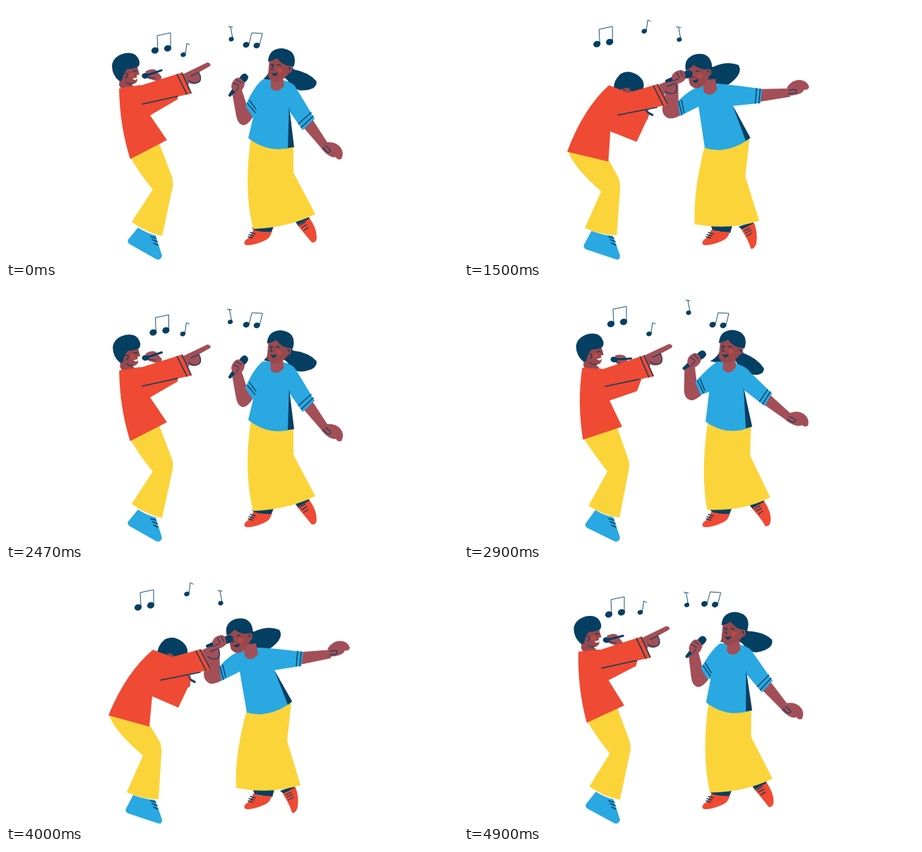
These frames come from a looping animation (640 by 360 pixels, 5000 ms). An HTML page:

```html
<!DOCTYPE html>
<html lang="en">
<head>
<meta charset="utf-8">
<title>Two singers</title>
<style>
  html, body { margin: 0; height: 100%; overflow: hidden; background: #fff; }
  svg { display: block; width: 640px; height: 360px; }
</style>
</head>
<body>
<svg id="stage" viewBox="0 0 640 360" stroke-linecap="round" stroke-linejoin="round"></svg>
<script>
const LOOP = 5000, BEAT = 2567;
const RED = '#ef4a33', BLUE = '#29a8e1', YELLOW = '#fbd43a', NAVY = '#053f61', SKIN = '#a34f58', FACE = '#98484d';
const stage = document.getElementById('stage');
const parts = [];

// Every part has three poses: leaning right, passing, leaning left.
const PASS = 0.655;
const numbers = s => s.match(/-?[\d.]+/g).map(Number);
function morph(poses, u) {
  const [a, m, b] = poses.map(numbers);
  let i = 0;
  return poses[0].replace(/-?[\d.]+/g, () => {
    const line = b[i] - a[i];
    const bend = (m[i] - a[i] - line * PASS) / (PASS * (1 - PASS));
    return (a[i++] + line * u + bend * u * (1 - u)).toFixed(2);
  });
}

function add(tag, attrs, inner = '') {
  const el = document.createElementNS('http://www.w3.org/2000/svg', tag);
  for (const k in attrs) el.setAttribute(k, attrs[k]);
  el.innerHTML = inner;
  stage.append(el);
  return el;
}
const shape = (fill, ...poses) => parts.push({ el: add('path', { fill }), attr: 'd', poses });
const line = (width, ...poses) =>
  parts.push({ el: add('path', { fill: 'none', stroke: NAVY, 'stroke-width': width }), attr: 'd', poses });
function group(inner, poses, late = false) {
  const el = add('g', {}, inner);
  parts.push({ el, attr: 'transform', late, poses: poses.map(([x, y, r]) => `translate(${x} ${y}) rotate(${r})`) });
  return el;
}
const fill = (color, d) => `<path fill="${color}" d="${d}"/>`;
const ink = (d, width = 1.2) => `<path fill="none" stroke="${NAVY}" stroke-width="${width}" d="${d}"/>`;

// Woman
const herHead = [[389, 82, 0], [349, 84, -5], [332, 90, -16]];
const hair = group(
  fill(NAVY, 'M0 -14L20 -4Q40 -14 56 -8Q64 4 44 20Q34 26 20 17L0 14Z') + fill(NAVY, ''), herHead, true);
const [lobe, strand] = hair.children;

shape(NAVY, 'M348 314L379 312L375 323L352 319Z', 'M349 313L380 311L376 322L352 318Z', 'M350 312L380 311L377 322L352 318Z');
shape(NAVY, 'M410 306L429 299L431 304L414 312Z', 'M394 311L415 304L417 310L399 316Z', 'M388 313L408 306L411 312L393 317Z');
add('path', { fill: RED, d: 'M350 317Q362 321 376 320Q375 329 365 333Q352 339 341 339Q335 338 339 332Q348 326 350 317Z' });
add('path', { fill: 'none', stroke: NAVY, 'stroke-width': 1.5, d: 'M346 321L353 323M344 324L351 326M343 327L349 329' });
shape(RED, 'M413 311L430 301Q440 315 440 328Q440 336 433 335Q428 329 413 311Z',
           'M398 315L416 306Q424 320 422 334Q419 343 414 342Q411 331 398 315Z',
           'M392 317L410 308Q415 321 413 336Q410 346 405 344Q402 333 392 317Z');
line(1.3, 'M416 311L424 306M419 314L426 310M422 318L428 314', 'M402 317L410 313M404 320L412 316M407 324L413 320',
          'M396 319L404 315M398 322L406 318M400 326L407 322');
shape(YELLOW, 'M347 186L407 198L407 236L438 295Q400 314 350 316Q336 260 347 186Z',
              'M343 192L405 190L401 240L424 301Q385 319 333 311Q329 260 343 192Z',
              'M341 198L404 188L398 242L417 305Q375 318 326 309Q323 265 341 198Z');

shape(SKIN, 'M421 172L434 161L457 197L450 206Z', 'M424 148L427 130L469 142L468 154Z', 'M417 134L420 116L461 113L460 125Z');
group(fill(SKIN, 'M-15 -4Q-6 -13 4 -11Q14 -9 16 1Q14 6 8 4Q4 11 -15 8Z') + ink('M-14 5Q-2 9 -3 2Q-7 0 -13 1'),
  [[463, 206, 40], [480, 145, 0], [471, 112, -12]]);
shape(SKIN, 'M341 140L350 157Q342 170 335 169Q328 167 326 155L320 122L333 116Z',
            'M311 130L315 149Q303 154 297 152Q288 149 289 138L297 102L312 100Z',
            'M303 139L306 156Q297 162 289 161Q280 157 280 147L287 108L302 108Z');
shape(BLUE,
  'M364 104L392 105Q408 108 412 118L437 160L420 176L402 150L407 200Q372 210 343 187L350 158L348 155L339 142Q352 112 364 104Z',
  'M348 107L368 109Q385 114 392 117L430 129L427 149L387 140L406 191Q372 212 341 196L339 138L314 151L309 128Q335 111 348 107Z',
  'M338 112L358 110Q375 111 385 112L421 116L418 136L380 142L405 187Q372 211 341 202L331 144L305 157L302 137Q318 118 338 112Z');
shape(NAVY, 'M401 143L408 200L399 201Z', 'M386 140L407 190L399 194Z', 'M380 142L405 186L399 191Z');
line(1.4, 'M435 156L418 172M432 151L414 167M342 138L353 151M345 134L354 146',
          'M427 129L424 148M422 128L419 147M312 128L317 149M316 127L320 147',
          'M418 116L416 136M413 115L411 136M303 137L308 155M307 135L311 152');
shape(SKIN, 'M375 102L392 100L394 113Q384 126 375 116Z', 'M350 102L367 100L368 114Q359 128 349 117Z',
            'M336 106L354 104L357 119Q347 132 338 122Z');
group(
  fill(FACE, 'M-16 -6L-18 17Q-14 27 -4 25L5 20Q14 14 14 4L4 -10Z') +
  `<ellipse cx="12" cy="7" rx="4.5" ry="6" fill="${FACE}"/>` +
  fill(NAVY, 'M-18 -3Q-17 -22 2 -22Q20 -20 20 -4Q19 8 15 3Q4 4 -5 -8Q-12 -4 -18 -3Z') +
  `<circle cx="-1" cy="9" r="3.5" fill="${RED}" opacity=".4"/>` +
  fill(NAVY, 'M-14 12Q-9 15 -4 12Q-5 18 -10 17Z') +
  ink('M-14 2Q-12 0 -10 2M-5 2Q-2 0 0 3M-11 2L-13 8L-10 8M11 6Q14 4 13 9'), herHead, true);

// Man
shape(YELLOW, 'M176 214L217 195L235 242Q238 250 235 262L221 326Q198 321 178 306L208 260Q190 239 176 214Z',
              'M155 208L212 208L225 243Q228 250 226 262L218 325Q195 324 173 313L196 261Q173 238 155 208Z',
              'M146 204L203 219L217 242Q221 250 220 262L216 325Q193 325 171 315L194 263Q150 225 146 204Z');
shape(BLUE, 'M187 314Q201 323 212 325Q217 342 221 354Q219 361 213 359L176 338Q171 335 173 331Z',
            'M183 317Q198 324 211 325Q217 342 221 354Q220 361 214 359L174 344Q169 341 171 337Z',
            'M180 319Q197 325 211 326Q217 342 221 354Q221 361 215 359L173 345Q168 342 170 338Z');
add('path', { fill: 'none', stroke: NAVY, 'stroke-width': 1.4, d: 'M205 327L212 329M207 331L214 334M209 336L215 339' });
group(
  fill(FACE, 'M-8 4L15 -3L19 11L15 12L16 18Q16 24 8 25L13 30Q-4 40 -10 26Z') +
  fill(NAVY, 'M-10 20Q-20 12 -20 -2Q-18 -15 -2 -19Q15 -22 19 -7Q20 1 12 2Q6 4 2 3L-3 9L-6 20Z') +
  `<circle cx="8" cy="12" r="3.5" fill="${RED}" opacity=".4"/>` +
  fill('#fff', 'M9 17L16 15L15 18Q12 20 9 17Z') +
  ink('M10 7Q13 4 15 7M-4 11Q0 7 2 11Q2 15 -1 16M9 24Q3 26 0 22'),
  [[170, 86, 0], [210, 93, 17], [234, 113, 48]], true);
group(
  fill(SKIN, 'M-10 -4Q-2 -9 4 -7L13 3Q14 9 5 9L-6 6Z') + ink('M-7 1L13 -6', 3) +
  `<ellipse cx="-10" cy="2" rx="5" ry="4" fill="${NAVY}"/>` + ink('M-6 4L4 5', 1),
  [[207, 97, 0], [246, 125, 40], [254, 153, 48]]);
shape(RED, 'M160 117L190 112L243 128L243 132L204 155L228 190L176 217Q161 170 160 117Z',
           'M188 110L212 119L262 139L246 175L208 170L213 211L154 210Q163 150 188 110Z',
           'M208 113L232 122L262 157L244 195L207 179L203 222L145 206Q170 145 208 113Z');
group(fill(SKIN, 'M-17 -5L18 -22Q24 -21 22 -17L6 -8Q12 2 6 6Q0 11 -8 7L-10 14Z') + ink('M-8 4Q-1 9 6 6Q11 1 6 -8L-5 -3'),
  [[267, 102, 0], [284, 107, 2], [294, 119, 2]]);
shape(RED, 'M165 117L190 113L250 94L263 124L193 139Z', 'M192 115L212 121L268 102L282 132L212 146Z',
           'M212 116L233 124L276 112L291 141L219 156Z');
line(1.5, 'M193 139L243 128M242 97L256 125M249 95L262 123', 'M212 146L262 136M262 104L274 133M267 103L280 131',
          'M219 156L275 145M269 115L283 142M275 113L289 140');

// Her microphone hand crosses in front of him.
group(
  fill(NAVY, 'M-20 -2L8 -5Q19 -7 19 0Q19 7 8 5L-20 2Q-22 0 -20 -2Z') +
  fill(SKIN, 'M-10 -4Q-6 -10 4 -9Q10 -7 9 -2L8 5Q2 10 -7 8Q-12 4 -10 -4Z') + ink('M-2 -7L0 1M4 -7L5 1M-9 3L-2 2', 1),
  [[329, 112, -51], [316, 95, -20], [303, 102, -18]]);

// Notes: a path of [phase, x, y] keys around one beat
const head = (x, y, r) => `<ellipse cx="${x}" cy="${y}" rx="${r}" ry="${r * .85}" transform="rotate(-20 ${x} ${y})" fill="${NAVY}"/>`;
const notes = [
  { art: head(0, 0, 5.2) + head(18, -3, 5.2) + ink('M4 -1L3 -21L22 -25L22 -5', .9),
    keys: [[0, 211, 63], [333, 208, 51], [700, 204, 37], [1000, 197, 33], [1433, 187, 53], [2100, 199, 63]] },
  { art: head(0, 0, 3.8) + ink('M3 -1L5 -16L9 -14', .9),
    keys: [[0, 251, 69], [333, 262, 65], [700, 274, 57], [1000, 271, 44], [1433, 256, 34], [2100, 248, 51]] },
  { art: head(0, 0, 3.6) + ink('M2 -1L-1 -17M-4 -18L2 -17', .9),
    keys: [[0, 319, 47], [333, 318, 35], [700, 316, 20], [1000, 309, 18], [1433, 304, 47], [2100, 312, 52]] },
  { art: head(0, 0, 4.6) + head(15, 1, 4.6) + ink('M4 -1L8 -17L23 -16L19 0', .9), hidden: [1150, 1750],
    keys: [[0, 340, 55], [333, 352, 52], [700, 366, 45], [1150, 358, 27], [1750, 342, 30], [2100, 341, 41]] }
];
for (const n of notes) n.el = add('g', {}, n.art);

function along(keys, phase) {
  const loop = [...keys, [BEAT, keys[0][1], keys[0][2]]];
  const i = loop.findIndex(k => k[0] > phase);
  const [p, q] = [loop[i - 1], loop[i]], f = (phase - p[0]) / (q[0] - p[0]);
  return [1, 2].map(c => p[c] + (q[c] - p[c]) * f);
}

const wave = ms => Math.cos(2 * Math.PI * ms / BEAT);
const sway = ms => 0.528 * (1 - wave(ms));

// Steps of 1/15 s, the first of every 700 ms held a little longer
function stepped(t) {
  const r = t % 700, step = 200 / 3;
  return t - r + (r < 100 ? 0 : 100 + Math.floor((r - 100) / step + 1e-6) * step);
}

function draw(now) {
  const phase = stepped(now % LOOP) % BEAT;
  for (const p of parts) p.el.setAttribute(p.attr, morph(p.poses, sway(phase + (p.late ? -15 : 40))));
  const droop = 0.5 + 0.5 * wave(phase - 500);
  lobe.setAttribute('transform', `rotate(${14 + 28 * droop}) scale(1 ${1 - 0.25 * droop})`);
  strand.setAttribute('d', `M-14 -4Q-14 14 ${-12 - 19 * droop} ${18 + 5 * droop}Q-10 ${22 + 6 * droop} 6 20L10 0Z`);
  for (const n of notes) {
    n.el.setAttribute('transform', `translate(${along(n.keys, phase)})`);
    n.el.setAttribute('visibility', n.hidden && phase > n.hidden[0] && phase < n.hidden[1] ? 'hidden' : 'visible');
  }
}

const start = performance.now();
function tick() {
  draw(performance.now() - start);
  requestAnimationFrame(tick);
}
tick();
</script>
</body>
</html>
```
